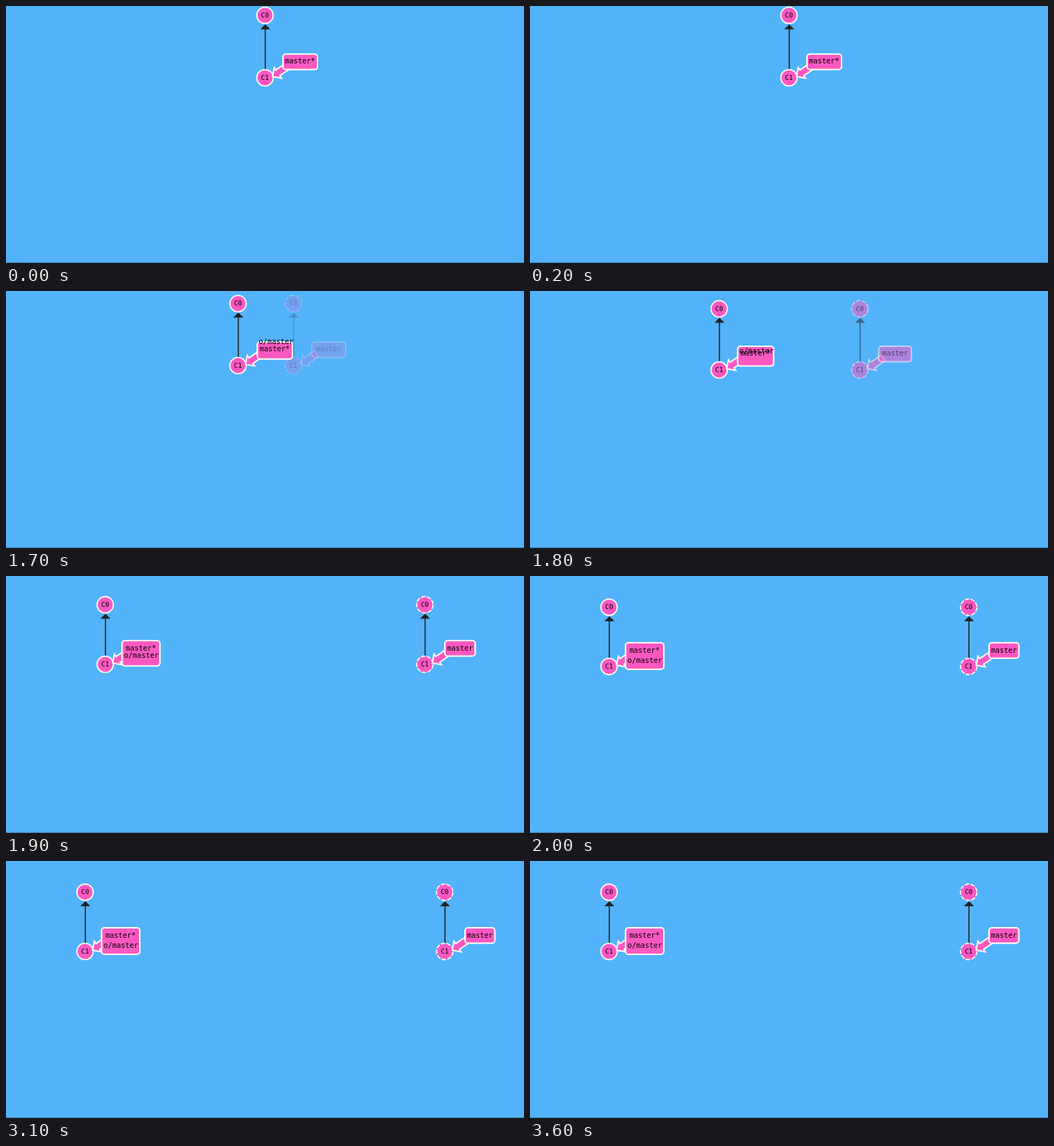
Animation, 720 px wide and 358 px high, one loop 3700 ms. Source, as an HTML page with a canvas:

```html
<!DOCTYPE html>
<html>
<head>
<meta charset="utf-8">
<style>
  html, body { margin: 0; width: 100%; height: 100%; overflow: hidden; background: #52b3fa; }
  canvas { display: block; }
</style>
</head>
<body>
<canvas id="stage" width="720" height="358"></canvas>
<script>
const ctx = document.getElementById('stage').getContext('2d');
const LOOP = 3700, SPLIT_AT = 1700, STEP = 100;
const SPLIT_PROGRESS = [0.15, 0.388, 0.888, 1];
const SKY = '#52b3fa', PINK = '#fc58c2', WHITE = '#fffdf6', INK = '#222222';
const MONO = '"DejaVu Sans Mono", monospace';

const mix = (from, to, p) => from + (to - from) * p;
const mixAll = (from, to, p) => from.map((v, i) => mix(v, to[i], p));

function paint(lineWidth) {
  ctx.fillStyle = PINK;
  ctx.strokeStyle = WHITE;
  ctx.lineWidth = lineWidth;
  ctx.fill();
  ctx.stroke();
}

function text(value, x, y, size = 10) {
  ctx.font = size + 'px ' + MONO;
  ctx.fillStyle = '#000';
  ctx.fillText(value, x, y);
}

function commit(name, x, y, dashed) {
  ctx.beginPath();
  ctx.arc(x, y, 11.4, 0, Math.PI * 2);
  ctx.setLineDash(dashed ? [6, 2] : []);
  paint(1.7);
  ctx.setLineDash([]);
  text(name, x, y + 0.5, 9);
}

function parentArrow(x, fromY, toY) {
  ctx.strokeStyle = ctx.fillStyle = INK;
  ctx.lineWidth = 1.6;
  ctx.beginPath();
  ctx.moveTo(x, fromY - 12);
  ctx.lineTo(x, toY + 19);
  ctx.stroke();
  ctx.beginPath();
  ctx.moveTo(x, toY + 12.5);
  ctx.lineTo(x + 7, toY + 19.5);
  ctx.lineTo(x - 7, toY + 19.5);
  ctx.fill();
}

function pointer(x, y) {
  ctx.save();
  ctx.translate(x + 10.5, y - 1.8);
  ctx.rotate(-0.6);
  ctx.beginPath();
  ctx.moveTo(26, -4.8);
  for (const [px, py] of [[9, -4.8], [9, -9], [0, 0], [9, 9], [9, 4.8], [26, 4.8]]) ctx.lineTo(px, py);
  ctx.closePath();
  paint(1.9);
  ctx.restore();
}

// box holds the outer edges: left, top, right, bottom
function labelBox([left, top, right, bottom]) {
  ctx.beginPath();
  ctx.roundRect(left + 1, top + 1, right - left - 2, bottom - top - 2, 4);
  paint(2);
}

function tree(x, p, box, dashed) {
  const top = mix(13, 43.5, p), bottom = mix(100, 126, p);
  parentArrow(x + 0.4, bottom, top);
  commit('C0', x, top, dashed);
  commit('C1', x, bottom, dashed);
  pointer(x, bottom);
  labelBox(box);
}

function draw(time) {
  const step = Math.floor((time - SPLIT_AT) / STEP);
  const p = step < 0 ? 0 : SPLIT_PROGRESS[Math.min(step, 3)];
  // labels jump slightly to the right when the split begins
  const shift = p > 0 ? 2.5 : 0;
  const startBox = [384 + shift, 66, 434 + shift, 89.5];

  ctx.fillStyle = SKY;
  ctx.fillRect(0, 0, 720, 358);
  ctx.fillStyle = '#3a82b8';
  ctx.fillRect(0, 357, 720, 1);
  ctx.textAlign = 'center';
  ctx.textBaseline = 'middle';

  if (p > 0) {
    ctx.globalAlpha = Math.min(1, p * 1.35);
    tree(mix(362.5, 609.8, p), p, mixAll(startBox, [637, 92, 680.5, 115.5], p), true);
    text('master', mix(409 + shift, 658.8, p), mix(77.5, 104, p));
    ctx.globalAlpha = 1;
  }

  tree(mix(360, 109.9, p), p, mixAll(startBox, [131.8, 92, 187, 131], p), false);
  text('master*', mix(408.8 + shift, 159.2, p), mix(77.5, 104, p));
  if (p > 0) text('o/master', mix(413.5, 159.7, p), mix(63, 118, p));
}

function tick() {
  draw(performance.now() % LOOP);
  requestAnimationFrame(tick);
}
tick();
</script>
</body>
</html>
```
